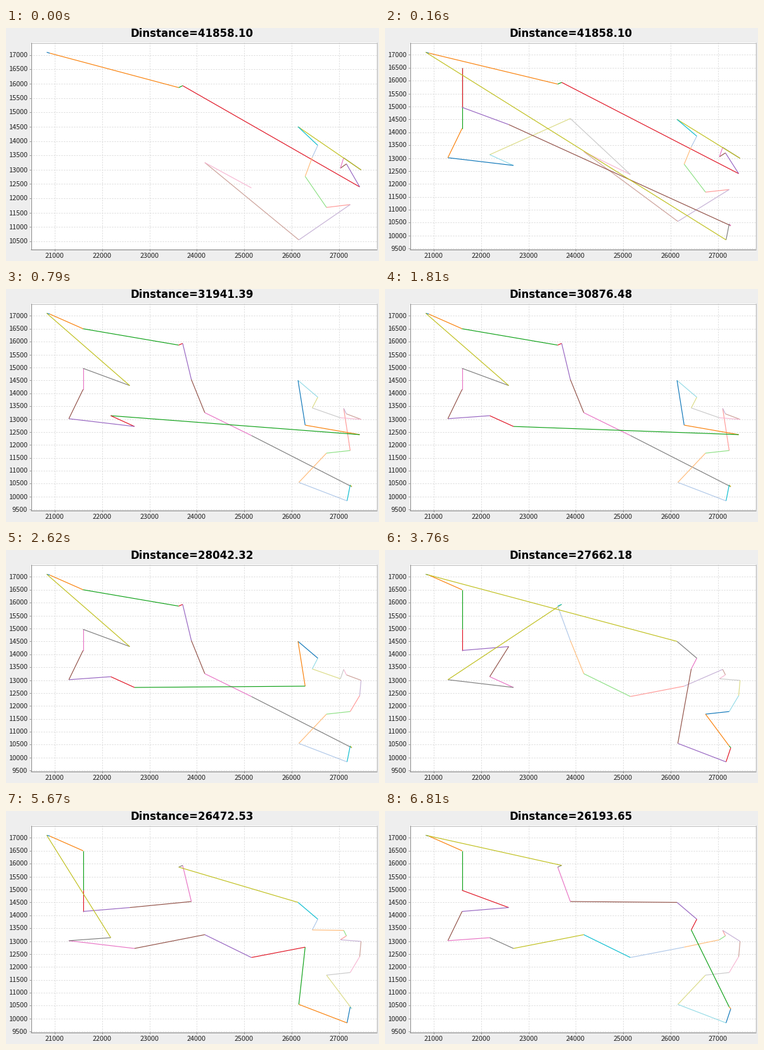
A matplotlib script for the animation above (8 s loop, 589x368 px).

```python
import math

import matplotlib.pyplot as plt
from matplotlib.animation import FuncAnimation
from matplotlib.collections import LineCollection
from matplotlib.patches import Rectangle

W, H, DPI = 589, 368, 100
PX = 72 / DPI
LEFT, TOP, RIGHT, BOTTOM = 39, 23, 585, 349
STEP_MS, LOOP_MS = 10, 8000

CITIES = [
    (20833.33, 17100), (20900, 17066.67), (21300, 13016.67), (21600, 14150),
    (21600, 14966.67), (21600, 16500), (22183.33, 13133.33), (22583.33, 14300),
    (22683.33, 12716.67), (23616.67, 15866.67), (23700, 15933.33),
    (23883.33, 14533.33), (24166.67, 13250), (25149.17, 12365.83),
    (26133.33, 14500), (26150, 10550), (26283.33, 12766.67),
    (26433.33, 13433.33), (26550, 13850), (26733.33, 11683.33),
    (27026.11, 13051.94), (27096.11, 13415.83), (27153.61, 13203.33),
    (27166.67, 9833.33), (27233.33, 10450), (27233.33, 11783.33),
    (27266.67, 10383.33), (27433.33, 12400), (27462.5, 12992.22),
]

COLORS = [
    "#0a74b8", "#fa7f06", "#0ca015", "#e01020", "#9562c0",
    "#904f45", "#e872c4", "#7c7c7c", "#bfbf1a", "#08bdd0",
    "#aec7e8", "#ffbb78", "#8ce083", "#ff9896", "#c5b0d5",
    "#cb9f97", "#f7b6d2", "#c9c9c9", "#dbdb85", "#94dbe6",
]

# Visiting orders, cities numbered from 1
FIRST = [1, 2, 10, 11, 28, 23, 21, 22, 29, 15, 19, 18, 17, 20, 26,
         16, 13, 14, 12, 7, 9, 3, 4, 6, 5, 8, 27, 25, 24]
SECOND = [1, 2, 10, 11, 28, 29, 23, 21, 22, 15, 19, 18, 17, 20, 26,
          16, 13, 14, 12, 9, 7, 3, 4, 6, 5, 8, 27, 25, 24]
THIRD = [1, 2, 6, 8, 12, 23, 22, 19, 18, 21, 29, 28, 26, 20, 17,
         14, 16, 27, 25, 24, 9, 3, 7, 4, 5, 10, 11, 15, 13]
FIFTH = [1, 2, 6, 10, 11, 12, 13, 14, 27, 25, 24, 16, 20, 26, 22,
         23, 29, 21, 18, 19, 15, 17, 28, 9, 7, 3, 4, 5, 8]
FOURTH = FIFTH[:23] + [7, 9] + FIFTH[25:]
SIXTH = FIFTH[:14] + [28, 29, 23, 22, 21, 18, 19, 15, 17] + FIFTH[23:]
SEVENTH = [1, 2, 6, 5, 4, 8, 7, 9, 3, 11, 10, 12, 13, 14, 17,
           22, 23, 21, 29, 28, 26, 20, 25, 27, 24, 16, 18, 19, 15]
EIGHTH = [1, 2, 6, 5, 4, 8, 12, 11, 10, 15, 19, 18, 22, 23, 21,
          29, 28, 26, 20, 27, 25, 24, 16, 17, 14, 13, 7, 3, 9]
NINTH = EIGHTH[:-3] + [9, 3, 7]
TENTH = [1, 2, 6, 5, 8, 4, 3, 7, 9, 13, 14, 17, 21, 23, 22,
         29, 28, 26, 20, 16, 24, 27, 25, 18, 19, 15, 12, 10, 11]


def path_length(tour):
    pts = [CITIES[c - 1] for c in tour]
    return sum(math.dist(a, b) for a, b in zip(pts, pts[1:]))


# start in ms, tour, number of edges drawn, distance in the title
STATES = [
    (0, FIRST, 17, 41858.10),
    (60, FIRST, 23, 41858.10),
    (160, FIRST, 29, 41858.10),
    (340, SECOND, 29, path_length(SECOND)),
    (490, THIRD, 29, 35851.49),
    (790, FOURTH, 29, path_length(FOURTH)),
    (1810, FIFTH, 29, 30876.48),
    (2620, SIXTH, 29, path_length(SIXTH)),
    (3760, SEVENTH, 29, 27662.18),
    (5340, EIGHTH, 29, 26882.98),
    (5670, NINTH, 29, path_length(NINTH)),
    (6810, TENTH, 29, 26193.65),
]


def axis_map(values, start, end):
    """Linear map from data to pixels with a 5% margin on both sides."""
    lo, hi = min(values), max(values)
    pad = 0.05 * (hi - lo)
    lo, hi = lo - pad, hi + pad
    return lo, hi, lambda v: start + (v - lo) / (hi - lo) * (end - start)


def ticks(lo, hi, step):
    return range(math.ceil(lo / step) * step, int(hi) + 1, step)


def crisp(v):
    return math.floor(v) + 0.5


fig = plt.figure(figsize=(W / DPI, H / DPI), dpi=DPI, facecolor="#eeeeee")
ax = fig.add_axes([0, 0, 1, 1])
ax.set_xlim(0, W)
ax.set_ylim(H, 0)
ax.axis("off")

ax.add_patch(Rectangle((LEFT, TOP), RIGHT - LEFT, BOTTOM - TOP,
                       fc="white", ec="none", zorder=0))
grid = LineCollection([], colors="#dadada", linewidths=PX,
                      linestyles=[(0, (2, 2))], zorder=1)
tour_lines = LineCollection([], linewidths=1.15 * PX, zorder=2)
frame_light = LineCollection(
    [[(LEFT, TOP + .5), (RIGHT + .5, TOP + .5)],
     [(RIGHT + .5, TOP), (RIGHT + .5, BOTTOM)]],
    colors="#bcbcbc", linewidths=PX, zorder=3)
frame_dark = LineCollection([], colors="#858585", linewidths=PX, zorder=3)
for lines in (grid, tour_lines, frame_light, frame_dark):
    ax.add_collection(lines, autolim=False)

LABEL = dict(family="Noto Sans CJK JP", fontsize=10.8 * PX, color="#202020",
             va="baseline")
title = ax.text(293.5, 14, "", family="DejaVu Sans", weight="bold",
                fontsize=16.65 * PX, ha="center", va="baseline", color="black")
x_labels = [ax.text(0, 363, "", ha="center", **LABEL) for _ in range(7)]
y_labels = [ax.text(34, 0, "", ha="right", **LABEL) for _ in range(16)]


def show(state):
    _, tour, edges, distance = state
    stops = [CITIES[c - 1] for c in (tour + tour[:1])[:edges + 1]]
    x_lo, x_hi, to_x = axis_map([p[0] for p in stops], LEFT, RIGHT)
    y_lo, y_hi, to_y = axis_map([p[1] for p in stops], BOTTOM, TOP)

    pts = [(to_x(x) + .5, to_y(y) + .5) for x, y in stops]
    tour_lines.set_segments(list(zip(pts, pts[1:])))
    tour_lines.set_color([COLORS[i % len(COLORS)] for i in range(edges)])

    x_ticks = ticks(x_lo, x_hi, 1000)
    y_ticks = ticks(y_lo, y_hi, 500)
    xs = [crisp(to_x(v)) for v in x_ticks]
    ys = [crisp(to_y(v)) for v in y_ticks]
    grid.set_segments([[(x, BOTTOM), (x, TOP)] for x in xs]
                      + [[(LEFT, y), (RIGHT, y)] for y in ys])
    frame_dark.set_segments(
        [[(LEFT + .5, TOP), (LEFT + .5, BOTTOM + 1)],
         [(LEFT, BOTTOM + .5), (RIGHT + 1, BOTTOM + .5)]]
        + [[(x, BOTTOM), (x, BOTTOM + 3)] for x in xs]
        + [[(LEFT - 2, y), (LEFT, y)] for y in ys])

    for label in x_labels + y_labels:
        label.set_text("")
    for label, v, x in zip(x_labels, x_ticks, xs):
        label.set_text(str(v))
        label.set_x(x)
    for label, v, y in zip(y_labels, y_ticks, ys):
        label.set_text(str(v))
        label.set_y(y + 4)
    title.set_text(f"Dinstance={distance:.2f}")


def reset():
    show(STATES[0])
    return []


def update(frame):
    now = frame * STEP_MS
    state = [s for s in STATES if s[0] <= now][-1]
    if now == state[0] or frame == 0:
        show(state)
    return []


anim = FuncAnimation(fig, update, frames=LOOP_MS // STEP_MS, init_func=reset,
                     interval=STEP_MS, repeat=True, repeat_delay=0)
plt.show()
```
